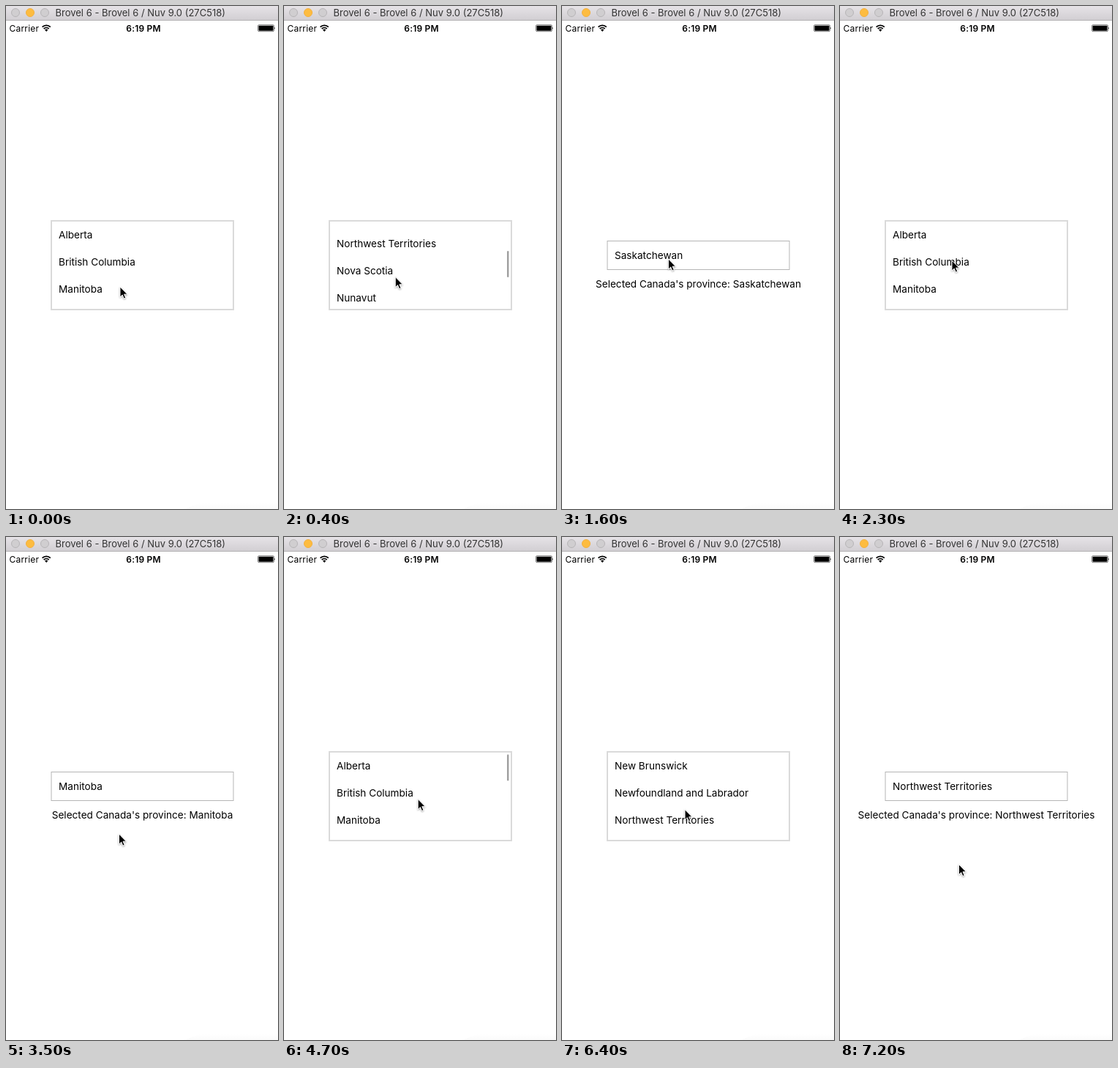
An HTML page that plays this animation: 372x686 px, repeating every 7.4 s.

```html
<!DOCTYPE html>
<html lang="en">
<head>
<meta charset="utf-8">
<title>Province drop-down</title>
<style>
  html, body { margin: 0; width: 100%; height: 100%; overflow: hidden; background: #fff; }
  svg { display: block; width: 372px; height: 686px; font: 13.6px Inter, Roboto, sans-serif; }
  .status { font-size: 12px; letter-spacing: .2px; }
</style>
</head>
<body>
<svg viewBox="0 0 372 686">
  <defs>
    <linearGradient id="chrome" x2="0" y2="1">
      <stop stop-color="#e6e3e7"/><stop offset="1" stop-color="#d1ced2"/>
    </linearGradient>
    <linearGradient id="shade" x2="0" y2="1">
      <stop stop-color="#fff"/><stop offset="1" stop-color="#fbfbfb"/>
    </linearGradient>
    <clipPath id="viewport"><rect x="63" y="294" width="247" height="119"/></clipPath>
    <filter id="shadow" x="-50%" y="-50%" width="200%" height="200%">
      <feDropShadow dx="0" dy="1" stdDeviation="0.8" flood-opacity=".4"/>
    </filter>
  </defs>
  <rect width="372" height="686" fill="#fff"/>
  <path d="M244 686L264 678H372V686Z" fill="url(#shade)"/>

  <rect width="372" height="19.5" fill="url(#chrome)"/>
  <rect y="19" width="372" height="1" fill="#b4b2b4"/>
  <g fill="#d0ced0" stroke="#b7b5b7">
    <circle cx="13" cy="9" r="5.5"/>
    <circle cx="33" cy="9" r="5.5" fill="#fdbc40" stroke="#f3b03e"/>
    <circle cx="53" cy="9" r="5.5"/>
  </g>
  <text x="67.5" y="14" font-size="13" fill="#333">Brovel 6 - Brovel 6 / Nuv 9.0 (27C518)</text>

  <text class="status" x="4.5" y="34.5">Carrier</text>
  <g fill="none" stroke="#000" stroke-width="1.8">
    <path d="M49.6 28.7A8 8 0 0 1 60.8 28.7"/>
    <path d="M51.7 31A5 5 0 0 1 58.7 31"/>
  </g>
  <path d="M55.2 35L53.1 32.6A3 3 0 0 1 57.3 32.6Z"/>
  <text class="status" x="188" y="34.5" text-anchor="middle" font-weight="600">6:19 PM</text>
  <rect x="344.5" y="25.7" width="22" height="9" rx="1.5" fill="none" stroke="#000" stroke-width=".5"/>
  <rect x="345.5" y="26.7" width="20" height="7" rx=".8"/>
  <path d="M367.2 28.7Q368.8 30.2 367.2 31.8Z"/>

  <g id="list">
    <rect x="62" y="293" width="249" height="121" fill="#fff" stroke="#dadada" stroke-width="2"/>
    <g clip-path="url(#viewport)"><g id="rows"></g></g>
    <rect id="bar" x="305" y="296.5" width="2.5" height="36" rx="1.25"/>
  </g>
  <g id="field">
    <rect x="62" y="320.5" width="249" height="39" fill="#fff" stroke="#b5b5b5"/>
    <text id="value" x="72" y="345"></text>
    <text id="label" x="186.5" y="384" text-anchor="middle"></text>
  </g>
  <g id="cursor" filter="url(#shadow)">
    <path d="M0 0V15L3.4 11.7 5.7 17 8.2 16 5.9 10.8H10.6Z"
          transform="scale(.94)" stroke="#fff"/>
  </g>
</svg>
<script>
const LOOP = 7400, STEP = 100, FADE = 200;
const ROW = 37, VISIBLE_HEIGHT = 120, BAR_TRAVEL = 78;
const provinces = ['Alberta', 'British Columbia', 'Manitoba', 'New Brunswick',
  'Newfoundland and Labrador', 'Northwest Territories', 'Nova Scotia', 'Nunavut',
  'Ontario', 'Prince Edward Island', 'Quebec', 'Saskatchewan', 'Yukon'];
const maxScroll = provinces.length * ROW - VISIBLE_HEIGHT;

// The list is closed, showing the choice, from start to end.
const selections = [
  { start: 1600, end: 2300, name: 'Saskatchewan' },
  { start: 3000, end: 4000, name: 'Manitoba' },
  { start: 6700, end: LOOP, name: 'Northwest Territories' },
];

// The second drag pulls down at the top, so only the scroll bar shows.
const drags = [
  { start: 20, end: 800, distance: maxScroll },
  { start: 4620, end: 5100, distance: 0 },
  { start: 5420, end: 6200, distance: 3 * ROW },
];

const home = { x: 156, y: 383 };
const moves = [
  { start: 0, end: 1000, x: 145.5, y: 345 },
  { start: 1900, end: 2100, x: 153, y: 347 },
  { start: 2600, end: 2800, x: 153, y: 371 },
  { start: 2900, end: 3100, x: 154.5, y: 405 },
  { start: 3500, end: 4000, x: 183, y: 345 },
  { start: 4580, end: 5000, x: 184, y: 408 },
  { start: 5400, end: 5970, x: 184, y: 325 },
  { start: 6200, end: 6500, x: 162.5, y: 388 },
  { start: 6900, end: 7200, x: 162.5, y: 446.5 },
];

const $ = id => document.getElementById(id);
const show = (id, visible) => $(id).setAttribute('visibility', visible ? 'visible' : 'hidden');
const place = (id, x, y) => $(id).setAttribute('transform', `translate(${x} ${y})`);
const clamp = v => Math.min(1, Math.max(0, v));

function progress({ start, end }, t) {
  const p = clamp((t - start) / (end - start));
  return p * p * (3 - 2 * p);
}

function cursorAt(t) {
  return moves.reduce((from, move) => {
    const p = progress(move, t);
    return { x: from.x + (move.x - from.x) * p, y: from.y + (move.y - from.y) * p };
  }, home);
}

$('rows').innerHTML = provinces
  .map((name, i) => `<text x="72" y="${317.3 + i * ROW}">${name}</text>`).join('');

function draw(t) {
  const chosen = selections.find(({ start, end }) => t >= start && t < end);
  show('list', !chosen);
  show('field', chosen);
  if (chosen) {
    $('value').textContent = chosen.name;
    $('label').textContent = `Selected Canada's province: ${chosen.name}`;
  }

  // Every selection sends the list back to its top.
  const lastSelection = Math.max(0, ...selections.map(s => s.start).filter(s => s <= t));
  const drag = drags.filter(d => d.start <= t && d.start > lastSelection).pop();
  const scroll = drag ? drag.distance * progress(drag, t) : 0;
  const barAlpha = drag ? 1 - clamp((t - drag.end) / FADE) : 0;
  place('rows', 0, -scroll);
  place('bar', 0, scroll / maxScroll * BAR_TRAVEL);
  $('bar').setAttribute('opacity', .37 * barAlpha);

  const { x, y } = cursorAt(t);
  place('cursor', x, y);
}

const startTime = performance.now();
function tick() {
  const elapsed = (performance.now() - startTime) % LOOP;
  draw(Math.floor(elapsed / STEP) * STEP);
  requestAnimationFrame(tick);
}
tick();
</script>
</body>
</html>
```
